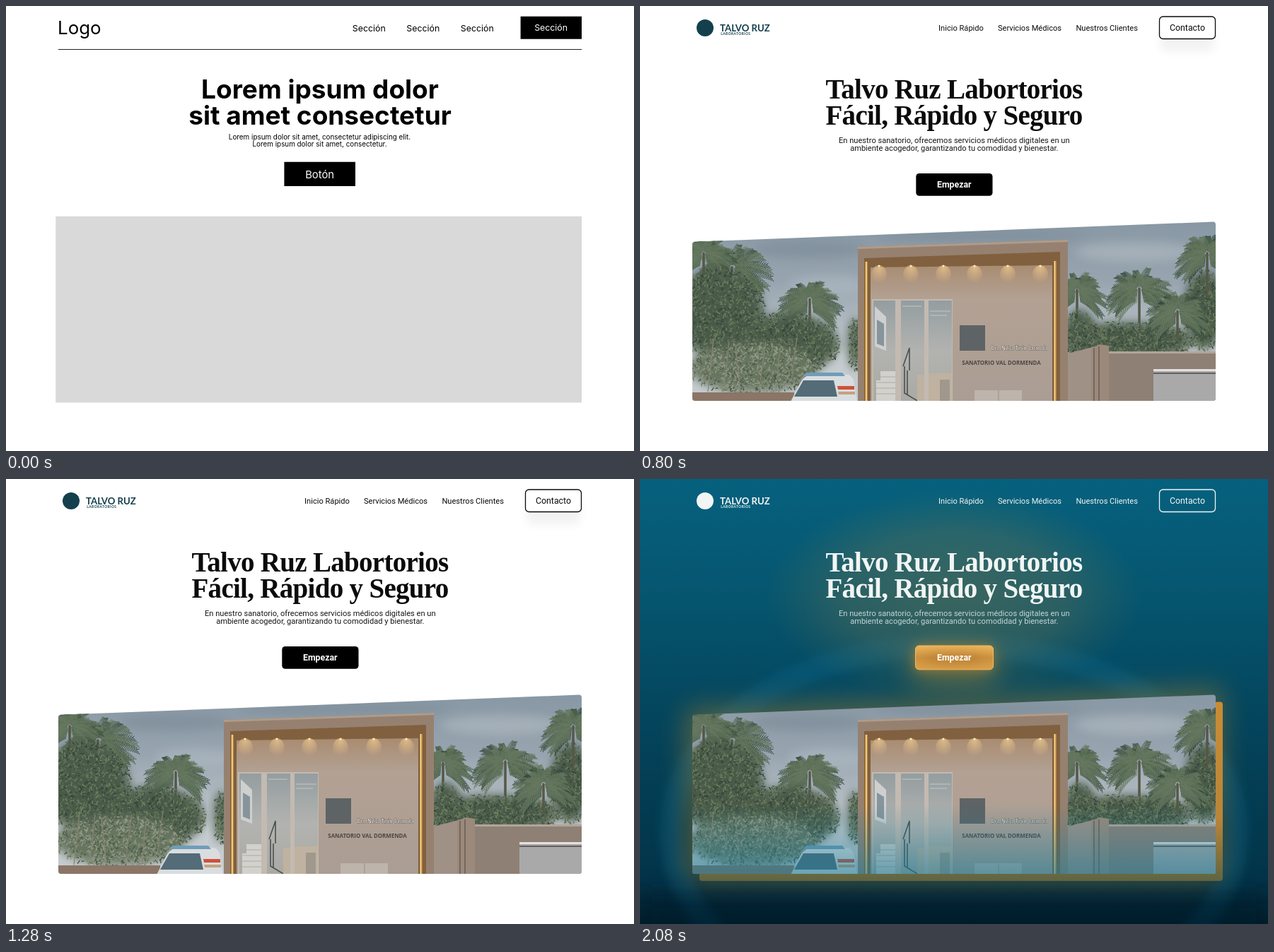
These frames come from a looping animation (888x630 px, 2.4 s). An HTML page:

```html
<!DOCTYPE html>
<html lang="es">
<head>
<meta charset="utf-8">
<title>Landing</title>
<style>
html, body { margin: 0; height: 100%; overflow: hidden; background: #fff }
svg { display: block; width: 100vw; height: 100vh; font-family: Roboto, sans-serif }
.wire, .site, .plain, .rich { display: none }
[data-scene=wire] .wire, [data-scene=plain] .plain, [data-scene=rich] .rich,
[data-scene=plain] .site, [data-scene=rich] .site { display: inline }
[data-scene=plain] { --ink: #0b0b0b; --brand: #14404d; --body: #161616 }
[data-scene=rich] { --ink: #f1f5f4; --brand: #f1f5f4; --body: #c3d5d8 }
.wire { font-family: Inter, sans-serif }
.mid { text-anchor: middle }
.site { fill: var(--ink) }
.brand { fill: var(--brand); font-family: Lato, sans-serif }
.title { font: bold 39px "Liberation Serif", serif; letter-spacing: -.7px }
.twig { fill: none; stroke-linecap: round }
</style>
</head>
<body>
<svg viewBox="0 0 888 630" data-scene="wire">
<defs>
  <path id="frame" d="M78 333.8L810 305.6Q814 305.5 814 309.5V555Q814 559 810 559H78Q74 559 74 555V338Q74 334 78 333.8Z"/>
  <clipPath id="crop"><use href="#frame"/></clipPath>
  <linearGradient id="sea" x2="0" y2="1">
    <stop stop-color="#06617e"/><stop offset=".25" stop-color="#065670"/>
    <stop offset=".5" stop-color="#04475f"/><stop offset=".76" stop-color="#033a50"/>
    <stop offset=".9" stop-color="#033449"/><stop offset="1" stop-color="#021b2a"/>
  </linearGradient>
  <radialGradient id="halo">
    <stop stop-color="#a8873c" stop-opacity=".32"/><stop offset=".6" stop-color="#a08440" stop-opacity=".23"/>
    <stop offset="1" stop-color="#808040" stop-opacity="0"/>
  </radialGradient>
  <linearGradient id="panel" x2="0" y2="1">
    <stop stop-color="#c98c35"/><stop offset=".65" stop-color="#b98539"/><stop offset="1" stop-color="#5f6542"/>
  </linearGradient>
  <linearGradient id="gold" x2="0" y2="1">
    <stop stop-color="#edb55c"/><stop offset=".5" stop-color="#cb9140"/><stop offset="1" stop-color="#dca04a"/>
  </linearGradient>
  <linearGradient id="tint" x2="0" y2="1">
    <stop offset=".62" stop-color="#197a97" stop-opacity="0"/><stop offset="1" stop-color="#197a97" stop-opacity=".58"/>
  </linearGradient>
  <linearGradient id="sky" x2="0" y2="1">
    <stop stop-color="#8797a3"/><stop offset=".35" stop-color="#98a5b0"/><stop offset=".75" stop-color="#c6ccd0"/>
  </linearGradient>
  <linearGradient id="plaster" x2="0" y2="1">
    <stop stop-color="#a98c71"/><stop offset=".25" stop-color="#b3a193"/><stop offset="1" stop-color="#aa9d94"/>
  </linearGradient>
  <linearGradient id="glass" x2="0" y2="1">
    <stop stop-color="#949da0"/><stop offset=".5" stop-color="#b2b3b0"/><stop offset="1" stop-color="#aaa9a4"/>
  </linearGradient>
  <radialGradient id="lamp" cy=".1" r=".8">
    <stop stop-color="#ffd998" stop-opacity=".6"/><stop offset="1" stop-color="#ffd08a" stop-opacity="0"/>
  </radialGradient>
  <filter id="soft" x="-50%" y="-80%" width="200%" height="260%"><feGaussianBlur stdDeviation="7"/></filter>
  <filter id="glow" x="-40%" y="-100%" width="180%" height="300%"><feGaussianBlur stdDeviation="18"/></filter>
</defs>

<g class="wire">
  <text x="73" y="40" font-size="25.9">Logo</text>
  <g class="mid" font-size="12.33">
    <text x="513.3" y="36">Sección</text><text x="589.8" y="36">Sección</text><text x="666.3" y="36">Sección</text>
    <path d="M727.6 14.8H814V46.8H727.6Z"/>
    <text x="770.6" y="35.2" fill="#fff">Sección</text>
  </g>
  <path d="M74 61.5H814" stroke="#222"/>
  <g class="mid" font-size="37" font-weight="700">
    <text x="444" y="131">Lorem ipsum dolor</text><text x="444" y="168">sit amet consectetur</text>
  </g>
  <g class="mid" font-size="9.87">
    <text x="443.5" y="189.3">Lorem ipsum dolor sit amet, consectetur adipiscing elit.</text>
    <text x="443.5" y="199.2">Lorem ipsum dolor sit amet, consectetur.</text>
  </g>
  <path d="M393.4 220.8H494V255H393.4Z"/>
  <text class="mid" x="443.6" y="243.6" font-size="14.8" fill="#fff">Botón</text>
  <path d="M70.3 297.8H814V561.5H70.3Z" fill="#d9d9d9"/>
</g>

<g class="site">
  <g class="rich">
    <path d="M0 0H888V630H0Z" fill="url(#sea)"/>
    <ellipse cx="444" cy="500" rx="400" ry="265" fill="none" stroke="#0d7099" stroke-width="32" opacity=".26" filter="url(#soft)"/>
    <path d="M0 590H888V660H0Z" fill="#021b2a" opacity=".6" filter="url(#glow)"/>
    <ellipse cx="444" cy="165" rx="265" ry="150" fill="url(#halo)"/>
    <use href="#frame" fill="#a8812f" stroke="#a8812f" stroke-width="22" opacity=".45" filter="url(#glow)"/>
    <use href="#frame" x="10" y="10" fill="url(#panel)"/>
  </g>

  <g class="brand">
    <circle cx="92" cy="31" r="12"/>
    <text x="113" y="35.5" font-size="13.2" font-weight="700">TALVO RUZ</text>
    <text x="114.3" y="41.2" font-size="4.8" font-weight="700" letter-spacing=".45">LABORATORIOS</text>
  </g>
  <g class="mid" font-size="11.1">
    <text x="454" y="34.8">Inicio Rápido</text><text x="551" y="34.8">Servicios Médicos</text><text x="660.2" y="34.8">Nuestros Clientes</text>
  </g>
  <g class="plain">
    <rect x="736" y="32" width="76" height="32" rx="6" fill="#000" opacity=".05" filter="url(#soft)"/>
    <rect x="734.5" y="15" width="79" height="31.5" rx="5" fill="#fff"/>
  </g>
  <rect x="734.5" y="15" width="79" height="31.5" rx="5" fill="none" stroke="var(--ink)" stroke-width="1.3"/>
  <text class="mid" x="774" y="35.3" font-size="12.33">Contacto</text>
  <g class="mid title"><text x="444" y="131">Talvo Ruz Labortorios</text><text x="444" y="168">Fácil, Rápido y Seguro</text></g>
  <g class="mid" font-size="11.1" fill="var(--body)">
    <text x="444.3" y="194.3">En nuestro sanatorio, ofrecemos servicios médicos digitales en un</text>
    <text x="444.3" y="205.4">ambiente acogedor, garantizando tu comodidad y bienestar.</text>
  </g>
  <rect class="plain" x="390.3" y="237" width="108.2" height="31.8" rx="4.5" fill="#000"/>
  <g class="rich">
    <rect x="385" y="240" width="118" height="50" rx="12" fill="#a8812f" opacity=".5" filter="url(#glow)"/>
    <rect x="387" y="234" width="114" height="38" rx="8" fill="#b98a35" opacity=".45" filter="url(#soft)"/>
    <rect x="389.5" y="236" width="110" height="33.8" rx="5" fill="url(#gold)" stroke="#f0bb66"/>
    <ellipse cx="444" cy="254" rx="42" ry="9" fill="#a87028" opacity=".45" filter="url(#soft)"/>
  </g>
  <text class="mid" x="444.3" y="257.3" font-size="12.33" font-weight="600" fill="#fff">Empezar</text>

  <g clip-path="url(#crop)">
    <path d="M74 300H814V560H74Z" fill="url(#sky)"/>
    <g filter="url(#soft)" opacity=".4">
      <ellipse cx="240" cy="345" rx="80" ry="12" fill="#71818e"/><ellipse cx="270" cy="395" rx="60" ry="14" fill="#bac4cb"/>
      <ellipse cx="700" cy="348" rx="85" ry="14" fill="#c3c9ce"/><ellipse cx="480" cy="326" rx="150" ry="8" fill="#72828e"/>
    </g>
    <g id="garden"></g>

    <path d="M74 547H218V560H74Z" fill="#8b7566"/>
    <path d="M213 560L228 531Q232 524 242 522H294Q302 524 303 535L307 560Z" fill="#d9dddf"/>
    <path d="M218 553L231 530H274L279 553Z" fill="#546b78"/>
    <path d="M231 524L235 519H286L290 524Z" fill="#6f9db8"/>
    <path d="M279 538H303V543H280Z" fill="#cf5138"/><path d="M280 546H304V550H281Z" fill="#c4a27e"/>

    <path d="M605 492L643 482V560H605Z" fill="#a09186"/>
    <path d="M663 490H814V560H663Z" fill="#8f8075"/><path d="M663 489H814V492H663Z" fill="#b2a499"/>
    <path d="M638 484L650 479L663 481V560H638Z" fill="#9b8a7c"/>
    <path d="M642 484V560M649 482V560" stroke="#6a5d54" stroke-width="1.5"/>
    <path d="M726 514H814V560H726Z" fill="#aaa9aa"/><path d="M726 515.5H814" stroke="#ecebe8" stroke-width="2.5"/>
    <path d="M726 520H814" stroke="#655f5d" stroke-width="2"/>

    <path d="M308 341L605 331V560H308Z" fill="#968170"/>
    <path d="M308 341L605 331V334L308 344Z" fill="#b09b89"/>
    <path d="M317 357L594 348V560H317Z" fill="#80603f"/>
    <path d="M326 370L583 367V560H326Z" fill="url(#plaster)"/>
    <path d="M320 362V560M587 361V560" stroke="#d99b3f" stroke-width="4" opacity=".6"/>
    <path d="M320 362V560M586.5 361V560" stroke="#ffdf96" stroke-width="1.5"/>
    <g id="lamps"></g>

    <path d="M328 415H442V560H328Z" fill="#c3bab1"/>
    <path d="M330 417H361V560H330ZM369 417H402V560H369ZM408 417H441V560H408Z" fill="url(#glass)"/>
    <path d="M332 425L348 440V488L332 482Z" fill="#cdd0ce"/><path d="M335 444L345 450V482L335 478Z" fill="#87949b"/>
    <path d="M334 560V530H340V517H361V560Z" fill="#d3d1cc"/>
    <path d="M337 525H361M335 533H361M334 541H361M334 549H361" stroke="#a9aaa8"/>
    <path d="M372 510L381 484V516M374 510V548L394 560M378 516V550" fill="none" stroke="#4a5050" stroke-width="1.6"/>
    <path d="M410 432H439M410 438H434M371 425H398" stroke="#dce2e2" opacity=".6"/>
    <path d="M392 522H402V560H392ZM408 520H441V560H408Z" fill="#bfb2a0"/><path d="M424 529H438V560H424Z" fill="#a1988d"/>
    <path d="M473 544H540V560H473Z" fill="#bdb4ab"/><path d="M507 544V560" stroke="#9c9186"/>
    <path d="M452 452H488V488H452Z" fill="#5e6365"/>
    <text x="496.5" y="486.5" font-family="Lato, sans-serif" font-size="7" fill="#f6f3ee" stroke="#5b5551" stroke-width=".8" paint-order="stroke">Dra. Nelva Tirón Casmeda</text>
    <text class="mid" x="511" y="507.7" font-family="Open Sans, sans-serif" font-size="7.9" font-weight="700" fill="#4c4643">SANATORIO VAL DORMENDA</text>
    <path class="rich" d="M74 300H814V560H74Z" fill="url(#tint)"/>
  </g>
</g>
</svg>
<script>
const svg = document.querySelector('svg');
let seed = 7;
const rand = () => (seed = seed * 16807 % 2147483647) / 2147483647;
const twigs = (d, color, width) => `<path class="twig" d="${d}" stroke="${color}" stroke-width="${width}"/>`;
const line = (x, y, dx, dy) => `M${x.toFixed(1)} ${y.toFixed(1)}l${dx.toFixed(1)} ${dy.toFixed(1)}`;

// A soft dark mass covered with short random strokes in several shades.
function foliage(cx, cy, rx, ry, count, [base, ...shades]) {
  const mass = `<ellipse cx="${cx}" cy="${cy}" rx="${rx}" ry="${ry}" fill="${base}" filter="url(#soft)"/>`;
  return mass + shades.map(color => {
    let d = '';
    for (let i = 0; i < count; i++) {
      const a = rand() * 2 * Math.PI, r = Math.sqrt(rand()) * 1.05;
      d += line(cx + rx * r * Math.cos(a), cy + ry * r * Math.sin(a), rand() * 6 - 3, rand() * 5 - 1);
    }
    return twigs(d, color, 1.5);
  }).join('');
}

// Drooping fronds with fine leaflets on both sides of each rib.
function palm(x, y, size, trunk, shades) {
  return twigs(`M${x} ${y}v${trunk}`, '#565746', 3.5) + shades.map(color => {
    let d = '';
    for (let i = 0; i < 13; i++) {
      const a = Math.PI * (-1.25 + 1.5 * (i + rand() * .7) / 13), len = size * (.75 + rand() * .35);
      for (let t = .1; t <= 1; t += .06) {
        const px = x + Math.cos(a) * len * t, py = y + Math.sin(a) * len * t * .9 + size * .35 * t * t;
        const leaf = size * .2 * (1.2 - t * .7);
        for (const side of [-.7, .7])
          d += line(px, py, Math.cos(a + side) * leaf, Math.sin(a + side) * leaf + leaf * .6);
      }
    }
    return twigs(d, color, 1);
  }).join('');
}

const deep = ['#4a5a48', '#36473a', '#56694e', '#6d7d5e'];
const pale = ['#66745f', '#4c5d48', '#7b896c', '#92988a'];
const fronds = ['#35493b', '#4c624b', '#66785f'];
document.getElementById('garden').innerHTML =
  palm(240, 415, 46, 80, fronds) +
  palm(130, 370, 54, 60, fronds) +
  palm(90, 350, 44, 60, fronds) +
  foliage(112, 435, 62, 62, 380, deep) +
  foliage(208, 478, 72, 42, 320, deep) +
  foliage(160, 512, 90, 34, 330, pale) +
  foliage(304, 478, 9, 36, 50, deep) +
  twigs('M96 546L104 470M118 546L126 475M142 546L135 480M168 546L178 475M192 546L198 485M214 530L222 470', '#8a8473', 1.2) +
  palm(618, 402, 42, 80, fronds) +
  palm(706, 400, 48, 75, fronds) +
  foliage(690, 474, 90, 26, 300, deep) +
  foliage(622, 462, 22, 32, 80, deep) +
  foliage(798, 430, 28, 55, 160, deep) +
  palm(760, 432, 44, 40, fronds) +
  palm(802, 350, 46, 60, fronds);

document.getElementById('lamps').innerHTML = [338, 383, 429, 473, 520, 566].map(x =>
  `<ellipse cx="${x}" cy="381" rx="11" ry="14" fill="url(#lamp)"/><circle cx="${x}" cy="368" r="1.5" fill="#fff0c8"/>`).join('');

const scenes = ['wire', 'plain', 'rich'];
function draw() {
  svg.dataset.scene = scenes[Math.floor(performance.now() / 800) % 3];
  requestAnimationFrame(draw);
}
draw();
</script>
</body>
</html>
```
